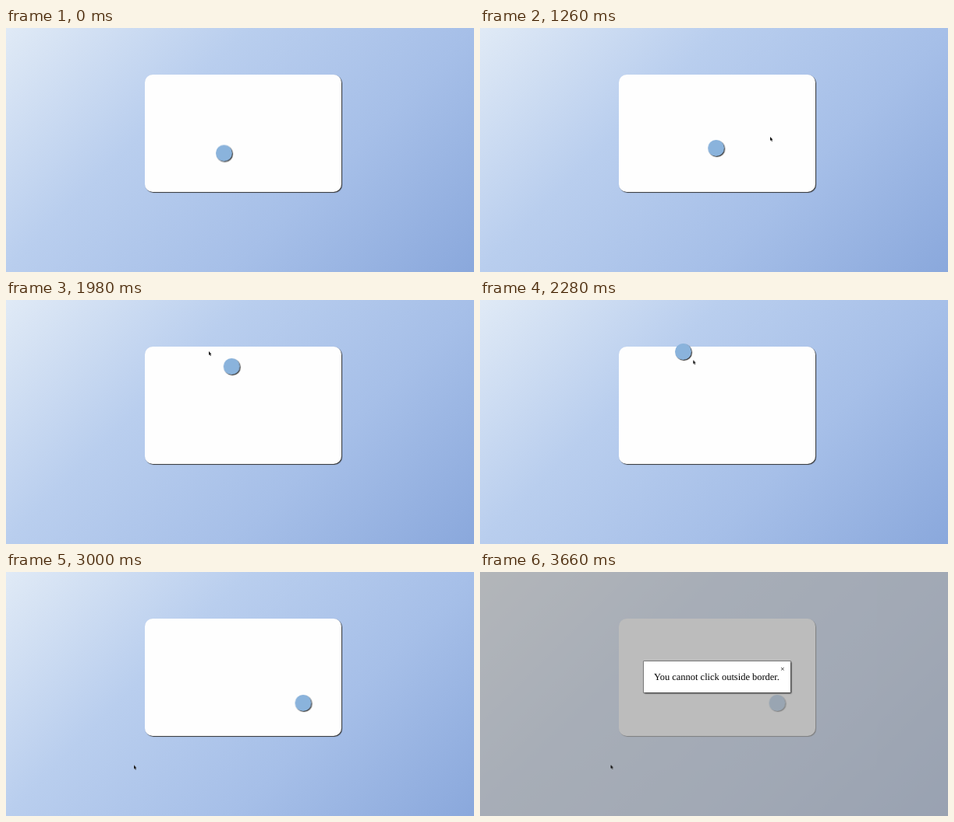
These frames come from a looping animation (600x314 px, 3720 ms). An HTML page without scripts:

```html
<!DOCTYPE html>
<html lang="en">
<head>
<meta charset="utf-8">
<title>Ball follows clicks</title>
<style>
  html, body { margin: 0; width: 100%; height: 100%; overflow: hidden; }
  body {
    position: relative;
    background: linear-gradient(135deg, #e0eaf6, #b9ceee 34%, #a6bfe8 66%, #8aa8dc);
  }
  div, svg { position: absolute; }

  .card {
    left: 178px; top: 60px; width: 252px; height: 151px;
    border-radius: 10px;
    background: #fefefe;
    box-shadow: 1px 1px 1px #333;
  }

  /* Each axis has its own easing, so the ball travels on a curve. */
  .ball-x, .ball-y { left: 0; top: 0; }
  .ball-x { animation: ball-x 3.72s infinite; }
  .ball-y { animation: ball-y 3.72s infinite; }
  .ball {
    left: -10.5px; top: -10.5px; width: 21px; height: 21px;
    border-radius: 50%;
    background: #8ab3dc;
    box-shadow: 1px 1px 1px #333;
  }
  @keyframes ball-x {
    0%, 32.45% { transform: translateX(279px); }
    40.51%, 49.65% { transform: translateX(372px); }
    57.72%, 66.4% { transform: translateX(260px); }
    74.46%, 100% { transform: translateX(380.5px); }
    0%, 32.45%, 40.51%, 49.65%, 57.72%, 66.4% {
      animation-timing-function: cubic-bezier(.3, .27, .07, 1.5);
    }
  }
  @keyframes ball-y {
    0%, 32.45% {
      transform: translateY(160.5px);
      animation-timing-function: cubic-bezier(.2, .6, .7, .5);
    }
    40.51%, 49.65% { transform: translateY(140px); }
    57.72%, 66.4% { transform: translateY(66px); }
    74.46%, 100% { transform: translateY(168px); }
    40.51%, 49.65%, 57.72%, 66.4% {
      animation-timing-function: cubic-bezier(.2, .4, .7, .5);
    }
  }

  .modal {
    inset: 0;
    background: rgba(160, 160, 160, .7);
    animation: modal 3.72s step-end infinite;
  }
  @keyframes modal {
    0% { visibility: hidden; }
    82.2%, 100% { visibility: visible; }
  }
  .box {
    left: 210px; top: 115px; width: 188px; height: 40px;
    background: #fff;
    box-shadow: 0 0 0 .6px #555, 1px 1px 2px #000;
    color: #000;
    font-family: "Liberation Serif", Times, serif;
    white-space: nowrap;
    text-rendering: geometricPrecision;
  }
  .msg { left: 13px; top: 12px; font-size: 12.46px; line-height: 16px; }
  .close { left: 175px; top: 6px; font-size: 10px; line-height: 10px; }

  .cursor {
    left: 0; top: 0; width: 6px; height: 8px;
    overflow: visible;
    animation: move 3.72s ease-in-out infinite, show 3.72s step-end infinite;
  }
  @keyframes show {
    0% { visibility: hidden; }
    1.6%, 100% { visibility: visible; }
  }
  @keyframes move {
    0%, 1.61% { transform: translate(346px, 213px); animation-timing-function: linear; }
    3.23% { transform: translate(362px, 178px); animation-timing-function: linear; }
    4.84% { transform: translate(379px, 140px); animation-timing-function: linear; }
    6.45% { transform: translate(383px, 125px); }
    8.06%, 38.71% { transform: translate(372px, 140px); }
    43.55%, 46.77% { transform: translate(335px, 112px); }
    49.46%, 59.95% { transform: translate(260px, 66px); }
    65.86%, 68.28% { transform: translate(380px, 168px); }
    75.27%, 89.5% { transform: translate(164px, 248.5px); }
    98.1%, 100% { transform: translate(167.5px, 248px); }
  }
</style>
</head>
<body>
  <div class="card"></div>
  <div class="ball-x"><div class="ball-y"><div class="ball"></div></div></div>
  <div class="modal">
    <div class="box">
      <div class="msg">You cannot click outside border.</div>
      <div class="close">×</div>
    </div>
  </div>
  <svg class="cursor" viewBox="0 0 6 8">
    <path d="M0 0V5L1.1 4 2 6.1 2.9 5.7 2.1 3.7H3.5Z" fill="#111" stroke="#fff" stroke-opacity=".4" stroke-width=".5" paint-order="stroke"/>
  </svg>
</body>
</html>
```
